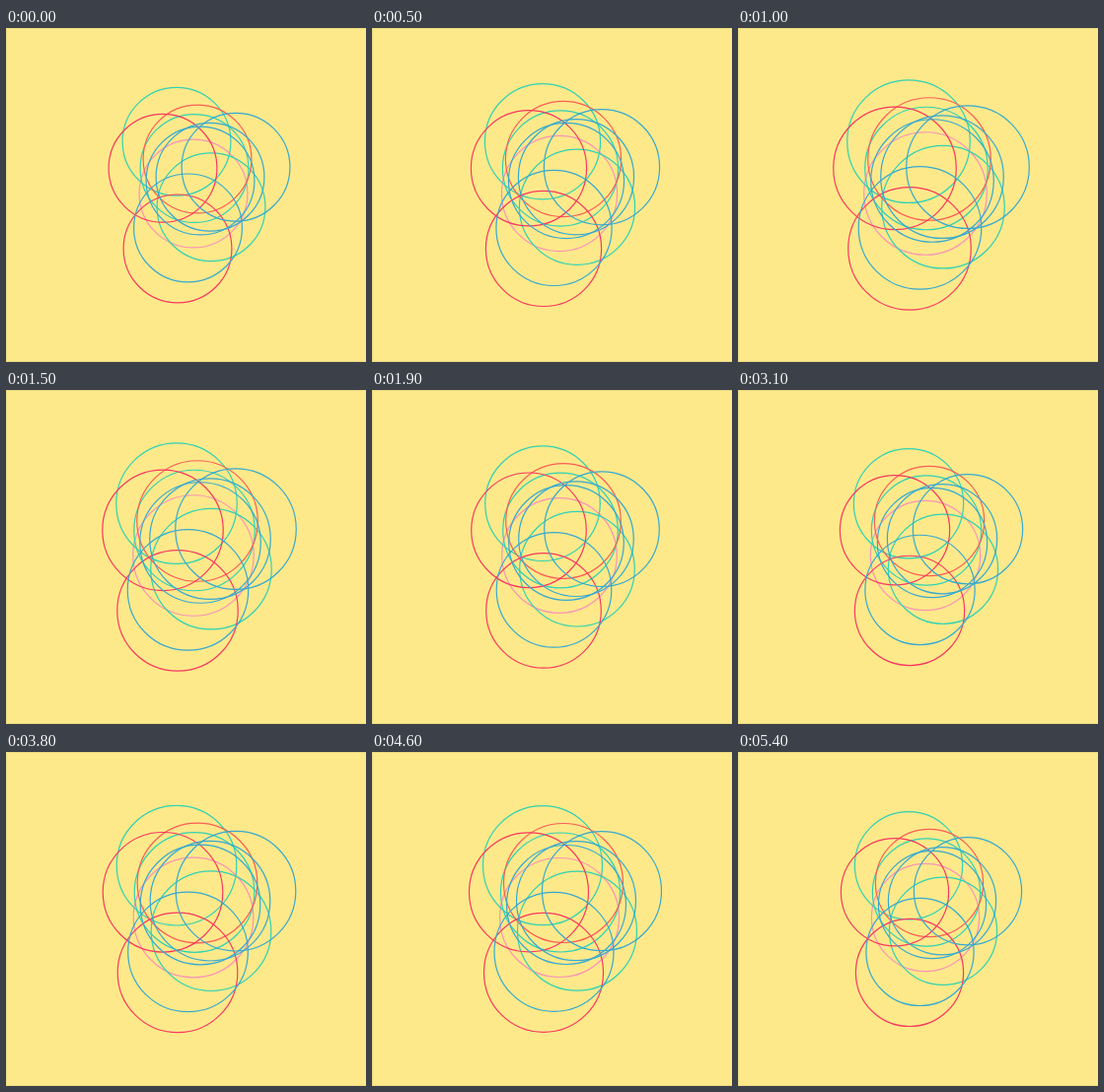
Animation, 365 px wide and 339 px high, one loop 5500 ms. Source, as an HTML page:

```html
<!DOCTYPE html>
<html lang="en">
<head>
<meta charset="utf-8">
<title>Pulsing circles</title>
<style>
  html, body { margin: 0; width: 100%; height: 100%; overflow: hidden; background: #fde98a; }
  svg { display: block; }
  circle { fill: none; stroke-width: 1.2; }
</style>
</head>
<body>
<svg id="stage" width="365" height="339" viewBox="0 0 365 339">
  <path d="M365 .5H.5V338.5H365" fill="none" stroke="#efdc85"/>
</svg>
<script>
const LOOP = 5500, STEP = 100, PERIOD = 3000, PEAK = 1180;
const MAX_RADIUS = 63.6, SPEED = 0.007375; // px per ms
const teal = '#2fd2b3', blue = '#36a9d0', red = '#fa3860', coral = '#fc5d55', pink = '#fb93b6';

const circles = [
  [190, 168, pink],
  [173, 115.2, teal],
  [191, 142.5, teal],
  [208, 181.7, teal],
  [194, 133, coral],
  [159, 142.3, red],
  [174, 223.9, red],
  [184.5, 202.9, blue],
  [207, 151.2, blue],
  [197, 155, blue],
  [233, 141.2, blue],
].map(([cx, cy, stroke]) => {
  const el = document.createElementNS('http://www.w3.org/2000/svg', 'circle');
  for (const [key, value] of Object.entries({ cx, cy, stroke })) el.setAttribute(key, value);
  document.getElementById('stage').append(el);
  return el;
});

// Linear growth and shrinkage around each peak
function radiusAt(time) {
  const phase = (time - PEAK + PERIOD) % PERIOD;
  return MAX_RADIUS - SPEED * Math.min(phase, PERIOD - phase);
}

function draw() {
  const time = Math.floor((performance.now() % LOOP) / STEP) * STEP;
  const r = radiusAt(time).toFixed(2);
  for (const circle of circles) circle.setAttribute('r', r);
  requestAnimationFrame(draw);
}
draw();
</script>
</body>
</html>
```
